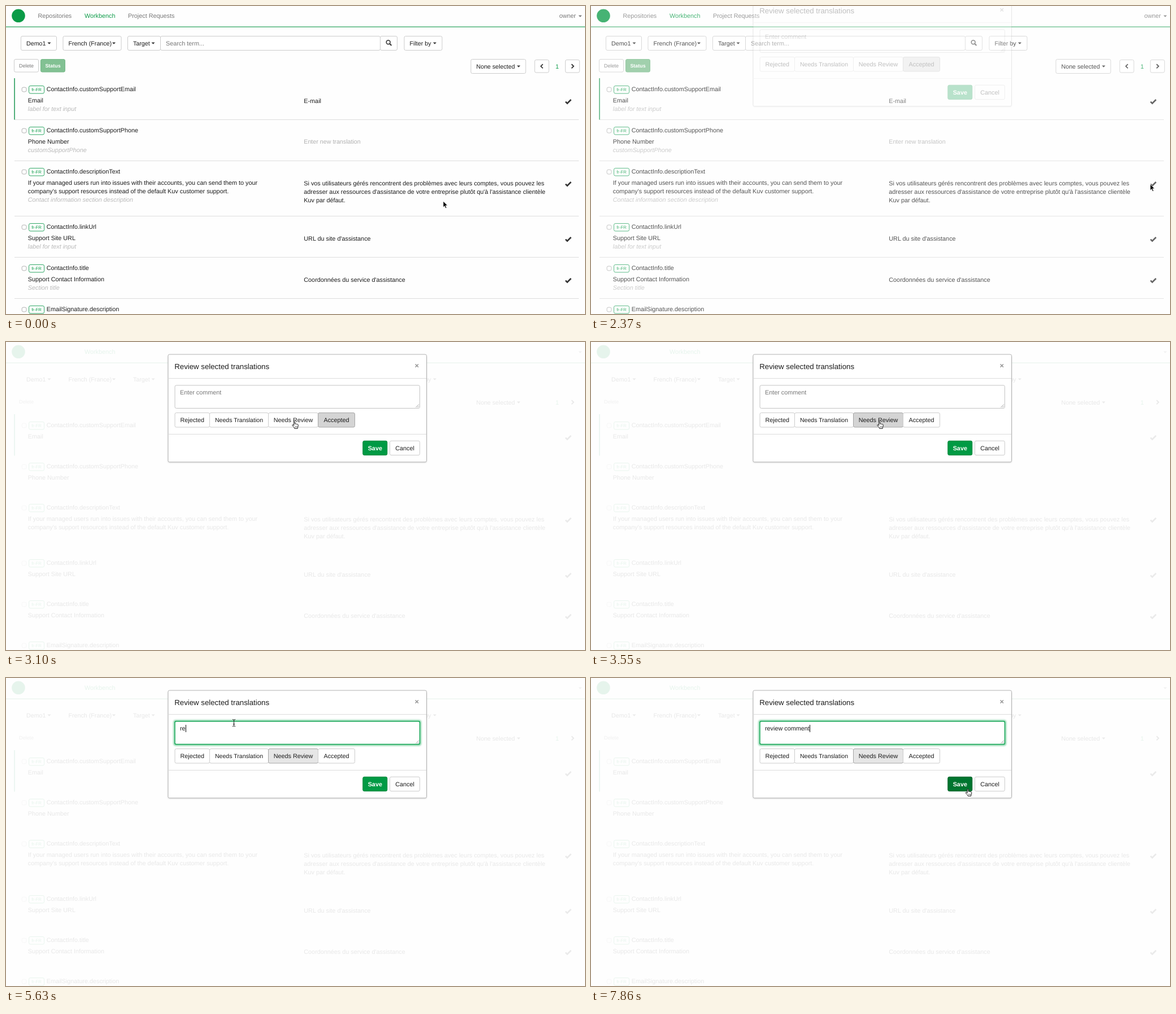
Animation, 1025 px wide and 546 px high, one loop 8000 ms. Source, as an HTML page:

```html
<!DOCTYPE html>
<html lang="en">
<head>
<meta charset="utf-8">
<title>Translation review</title>
<style>
  html, body { margin: 0; width: 100%; height: 100%; overflow: hidden; background: #fefefe; }
  svg { display: block; }
  text {
    font: 10.82px "Liberation Sans", Arial, sans-serif;
    fill: #1c1c1c; white-space: pre; text-rendering: geometricPrecision;
  }
  .nav { fill: #777; }
  .green { fill: #0a9b47; }
  .hint { fill: #b9b9b9; font-style: italic; }
  .empty { fill: #b0b0b0; }
  .mid { text-anchor: middle; }
  .bold { font-weight: bold; fill: #fff; }
  .panel { fill: #fff; stroke: #ccc; }
  .line { stroke: #ddd; fill: none; }
  .icon { fill: none; stroke: #333; }
  .covered .dim { opacity: 0; }
</style>
</head>
<body>
<svg width="1025" height="546">
  <defs>
    <filter id="blur" x="-10%" y="-50%" width="120%" height="200%"><feGaussianBlur stdDeviation="1.6"/></filter>
  </defs>
  <g id="page"></g>
  <rect id="veil" width="1025" height="546" fill="#fefefe"/>
  <g id="modal"></g>
  <g id="arrow">
    <path d="M0 0V10.9L2.5 8.6 4.2 12.6 6.1 11.8 4.4 7.8H7.8Z" fill="#000" stroke="#fff" stroke-width=".8"/>
  </g>
  <g id="hand">
    <path d="M3.6 8.2V1.9C3.6.3 5.6.3 5.6 1.9V5.2C6.2 4.6 7.3 4.8 7.5 5.6 8.2 5 9.2 5.3 9.4 6.1 10.2 5.6 11.3 6 11.3 7.2 11.3 9.6 10.4 10.6 10.2 13.3H4.8C4.3 11.2 2.5 10 1.1 8.2.2 7 1.5 5.9 2.5 7Z" fill="#fff" stroke="#111" stroke-width="1"/>
    <path d="M6 9.4V11.6M7.6 9.4V11.6M9.1 9.4V11.6" stroke="#111" stroke-width=".6"/>
  </g>
  <g id="beam">
    <path d="M-2.6-6.2Q0-6.2 0-4.6 0-6.2 2.6-6.2M0-5V5M-2.6 6.2Q0 6.2 0 4.6 0 6.2 2.6 6.2M-1.5 2.2H1.5" fill="none" stroke="#222"/>
  </g>
</svg>
<script>
const LOOP = 8000;
const $ = id => document.getElementById(id);

const text = (x, y, s, cls = '', size = 10.82, extra = '') =>
  `<text x="${x}" y="${y}" class="${cls}" style="font-size:${size}px" ${extra}>${s}</text>`;
const rect = (x, y, w, h, cls = 'panel', extra = '') =>
  `<rect x="${x}" y="${y}" width="${w}" height="${h}" rx="2.5" class="${cls}" ${extra}/>`;
const path = (d, cls, extra = '') => `<path d="${d}" class="${cls}" ${extra}/>`;
const drop = (x, y, color = '#333') => path(`M${x} ${y}h6l-3 3.2z`, '', `fill="${color}"`);
const select = (x, w, label, arrowX, y = 53.5, h = 25) =>
  rect(x, y, w, h, 'panel dim') + text(x + 9.5, y + 16.1, label, '', 10.7) + drop(arrowX, y + 11);

const rows = [
  { y: 128, key: 'ContactInfo.customSupportEmail', src: ['Email'], hint: 'label for text input', out: ['E-mail'] },
  { y: 201, key: 'ContactInfo.customSupportPhone', src: ['Phone Number'], hint: 'customSupportPhone' },
  { y: 274, key: 'ContactInfo.descriptionText',
    src: ['If your managed users run into issues with their accounts, you can send them to your',
          "company's support resources instead of the default Kuv customer support."],
    hint: 'Contact information section description',
    out: ['Si vos utilisateurs gérés rencontrent des problèmes avec leurs comptes, vous pouvez les',
          "adresser aux ressources d'assistance de votre entreprise plutôt qu'à l'assistance clientèle",
          'Kuv par défaut.'] },
  { y: 372, key: 'ContactInfo.linkUrl', src: ['Support Site URL'], hint: 'label for text input', out: ["URL du site d'assistance"] },
  { y: 445, key: 'ContactInfo.title', src: ['Support Contact Information'], hint: 'Section title',
    out: ["Coordonnées du service d'assistance"] },
  { y: 518, key: 'EmailSignature.description', src: [], hint: '' }
];

function row({ y, key, src, hint, out }) {
  let s = y > 128 ? path(`M15 ${y + .5}H1014`, 'line dim') : '';
  s += rect(28.2, y + 16.2, 7.8, 7.8, '', 'fill="#fff" stroke="#a9a9a9" stroke-width=".9"');
  s += rect(40.6, y + 13.6, 27, 13.4, '', 'fill="#fff" stroke="#2aa562"');
  s += text(54.1, y + 23, 'fr-FR', 'mid green', 7.8) + text(71.7, y + 23.2, key);
  src.forEach((line, i) => s += text(38.8, y + 42.5 + i * 15.2, line));
  s += text(38.8, y + 42.3 + src.length * 15.2, hint, 'hint dim');
  if (out) {
    out.forEach((line, i) => s += text(527.3, y + 43.5 + i * 15.2, line));
    s += path(`M990.6 ${y + 41.6}l3 3 6.6-6.6`, 'icon', 'stroke-width="2.7"');
  } else if (src.length) {
    s += text(527.3, y + 43.2, 'Enter new translation', 'empty dim', 10.7);
  }
  return s;
}

$('page').innerHTML =
  '<circle cx="22" cy="17.3" r="11.8" fill="#0a9b47"/>' +
  text(56.5, 21.3, 'Repositories', 'nav dim', 10.75) + text(139, 21.3, 'Workbench', 'green') +
  text(216, 21.3, 'Project Requests', 'nav dim') +
  text(979.5, 21.3, 'owner', 'nav dim') + drop(1013.5, 16.5, '#777') +
  '<rect y="36.3" width="1025" height="1.4" fill="#45b071"/>' +
  select(26.5, 63, 'Demo1', 73.5) + select(101, 103, 'French (France)', 188) +
  rect(273.5, 53.5, 389, 25, 'panel dim') + select(215.5, 58, 'Target', 257.5) +
  text(283, 69.5, 'Search term...', 'nav dim') + rect(662.5, 53.5, 30, 25, 'panel dim') +
  '<g class="dim"><circle cx="676.7" cy="64.2" r="3.4" class="icon" stroke-width="1.6"/>' +
  path('M679.2 66.8L682.4 70', 'icon', 'stroke-width="2"') + '</g>' +
  select(705, 67, 'Filter by', 756) +
  rect(14.5, 94.5, 43, 22.5, 'panel dim') + text(36, 108.8, 'Delete', 'mid nav', 9) +
  rect(61.5, 94.5, 43, 22.5, 'dim', 'fill="#82c193" stroke="#76b988"') +
  text(83, 108.8, 'Status', 'mid bold dim', 8.9) +
  select(823, 97, 'None selected', 904.5, 94.5, 25) +
  rect(936, 95.5, 25, 22.5, 'panel dim') + path('M950.4 103.2l-3.6 3.6 3.6 3.6', 'icon dim', 'stroke-width="1.7"') +
  text(972.8, 110.6, '1', 'green') +
  rect(990.3, 95.5, 25, 22.5, 'panel dim') + path('M1001.2 103.2l3.6 3.6-3.6 3.6', 'icon', 'stroke-width="1.9"') +
  rows.map(row).join('') +
  '<rect x="14.3" y="128" width="1.6" height="73.5" fill="#2a9d5c"/>';

const choices = [
  ['Rejected', 299, 360.5], ['Needs Translation', 360.5, 464.5],
  ['Needs Review', 464.5, 552.5], ['Accepted', 552.5, 617.5]
];

$('modal').innerHTML =
  rect(287, 23.5, 457.5, 190, '', 'fill="#000" opacity=".22" filter="url(#blur)"') +
  rect(287, 22, 457.5, 190.8, '', 'fill="#fff" stroke="#b4b4b4"') +
  text(298.2, 48, 'Review selected translations', '', 13.25) +
  path('M724.6 39.2l5.4 5.4m0-5.4l-5.4 5.4', '', 'stroke="#999" stroke-width="1.5"') +
  path('M287.5 64.5H744M287.5 163.5H744', 'line') +
  rect(298, 76, 435.5, 42.5, '', 'id="glow" fill="none" stroke="#58c487" stroke-width="2.5" filter="url(#blur)"') +
  rect(299, 76.8, 433.5, 40.7, 'panel', 'id="field"') +
  path('M725.5 116L731 110.5M728.6 116L731 113.6', '', 'stroke="#888" stroke-width=".8"') +
  text(308, 93, 'Enter comment', 'nav', 10.82, 'id="ghost"') +
  text(308, 93, '', '', 10.82, 'id="typed"') +
  '<rect id="caret" y="83" width="1" height="13" fill="#111"/>' +
  choices.map(([label, a, b], i) =>
    rect(a, 125.5, b - a, 25.5, 'panel', `id="choice${i}"`) +
    text((a + b) / 2, 142.2, label, 'mid', i === 1 ? 10.55 : 10.8)).join('') +
  rect(631.8, 175.3, 43, 25.3, '', 'id="save"') + text(653.3, 191.8, 'Save', 'mid bold') +
  rect(679.5, 175.3, 53, 25.3, 'panel', 'id="cancel"') + text(706, 191.8, 'Cancel', 'mid');

// Each track lists [start time, value...]; a value holds until the next start.
const smooth = u => u * u * (3 - 2 * u);
const glide = Array.from({ length: 7 }, (_, i) => {
  const u = smooth((i + 1) / 7);
  return [450 + i * 148.3, 'arrow', 774 + 215 * u, 346 - 30 * u];
});
const pointer = [
  [0, 'arrow', 774, 346], ...glide, [1930, 'arrow', 990, 316],
  [2670, 'arrow', 965, 305], [2810, 'arrow', 850, 248], [2960, 'hand', 695, 185],
  [3100, 'hand', 506, 140], [3850, 'hand', 498, 137], [4000, 'arrow', 462, 121],
  [4140, 'beam', 416, 92], [4290, 'beam', 403.5, 79.7],
  [7270, 'beam', 412, 84], [7420, 'arrow', 453, 103], [7570, 'arrow', 548, 154],
  [7715, 'arrow', 628, 184], [7860, 'hand', 662.5, 196]
];
const shown = [[0, 0], [2220, .04], [2370, .27], [2520, .85], [2670, 1]];
const typing = [
  [0, 0], [5630, 2], [5780, 3], [5930, 5], [6080, 6], [6220, 8],
  [6370, 9], [6520, 11], [6670, 13], [6820, 14]
];
const blink = [[0, 0], [4290, 1], [4890, 0], [5330, 1], [7270, 0], [7715, 1]];
const picked = [[0, 3, '#d4d4d4'], [3400, 2, '#d4d4d4'], [3850, 2, '#e6e6e6']];

const at = (track, t) => track.findLast(step => step[0] <= t).slice(1);
const show = (id, on) => $(id).style.display = on ? '' : 'none';

function render(t) {
  const [p] = at(shown, t);
  $('veil').style.opacity = .9 * p;
  $('modal').style.opacity = p;
  $('modal').setAttribute('transform', `translate(0 ${-48 * (1 - p)})`);
  $('page').classList.toggle('covered', p === 1);

  const [kind, x, y] = at(pointer, t);
  for (const id of ['arrow', 'hand', 'beam']) show(id, id === kind);
  $(kind).setAttribute('transform', `translate(${x} ${y})`);

  const [count] = at(typing, t);
  $('typed').textContent = 'review comment'.slice(0, count);
  show('ghost', count === 0);
  show('caret', at(blink, t)[0]);
  $('caret').setAttribute('x', 308.3 + (count ? $('typed').getComputedTextLength() : 0));

  const focus = t >= 4440;
  show('glow', focus);
  $('field').style.stroke = focus ? '#12a453' : '#c4c4c4';
  $('field').style.strokeWidth = focus ? 1.4 : 1;

  const [active, shade] = at(picked, t);
  choices.forEach((_, i) => {
    const hover = i === 2 && t >= 3250 && t < 3400;
    const el = $('choice' + i);
    el.style.fill = i === active ? shade : hover ? '#e6e6e6' : '#fff';
    el.style.stroke = i === active ? '#a5a5a5' : '#ccc';
  });
  const over = t >= 7860;
  $('save').style.fill = over ? '#00752f' : '#009a44';
  $('save').style.stroke = over ? '#00602a' : '#00873b';
  $('cancel').style.fill = t >= 2960 && t < 3100 ? '#e6e6e6' : '#fff';
}

function tick() {
  render(performance.now() % LOOP);
  requestAnimationFrame(tick);
}
tick();
</script>
</body>
</html>
```
